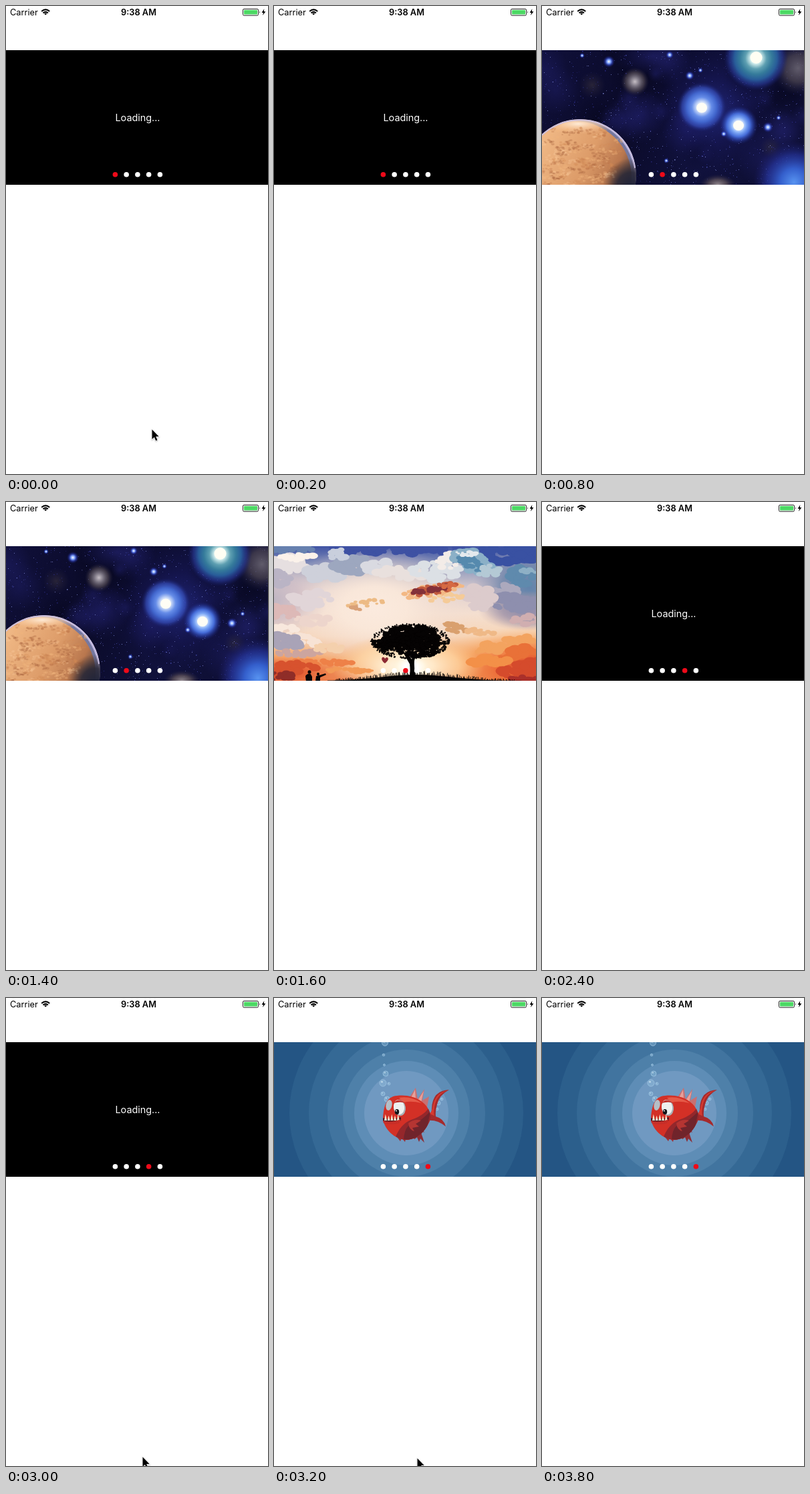
These frames come from a looping animation (392 px wide and 699 px high, 4000 ms). An HTML page with a canvas:

```html
<!DOCTYPE html>
<html lang="en">
<head>
<meta charset="utf-8">
<title>Image carousel</title>
<style>
  html, body { margin: 0; width: 100%; height: 100%; overflow: hidden; background: #fff; }
  canvas, svg { position: absolute; left: 0; top: 0; width: 392px; height: 699px; }
  text { font-family: Inter, Roboto, sans-serif; }
</style>
</head>
<body>
<canvas id="stage" width="392" height="699"></canvas>
<svg viewBox="0 0 392 699">
  <text x="6" y="14" font-size="12.8">Carrier</text>
  <text x="198.5" y="14" font-size="12.8" font-weight="600" text-anchor="middle">9:38 AM</text>
  <g fill="none" stroke="#000" stroke-width="2">
    <path d="M53.2 8.1Q59.2 2.6 65.2 8.1M55.5 10.5Q59.2 7.2 62.9 10.5"/>
    <path d="M57.2 11.4Q59.2 9.7 61.2 11.4L59.2 13.6Z" fill="#000" stroke="none"/>
  </g>
  <rect x="354.5" y="4.5" width="23" height="9.6" rx="1.6" fill="#fff" stroke="#222"/>
  <rect x="356" y="6" width="20" height="6.6" rx=".6" fill="#4cd964"/>
  <path d="M379 7.5Q380.6 9.3 379 11.1Z"/>
  <path d="M386.3 4.3L382.6 9.9H385L384 14L388.4 8.3H385.8Z"/>
  <text id="loading" x="197" y="172" font-size="14.4" text-anchor="middle" fill="#fff">Loading...</text>
</svg>
<script>
const LOOP = 4000, TOP = 66, W = 392, H = 201;
const ctx = document.getElementById('stage').getContext('2d');
const loading = document.getElementById('loading');

function seeded(seed) {
  return () => {
    seed = (seed * 1664525 + 1013904223) % 4294967296;
    return seed / 4294967296;
  };
}

function makePage(paint) {
  const page = document.createElement('canvas');
  page.width = W;
  page.height = H;
  const c = page.getContext('2d');
  c.translate(0, -TOP);
  paint(c);
  return page;
}

function oval(c, x, y, rx, ry, color, turn = 0) {
  c.fillStyle = color;
  c.beginPath();
  c.ellipse(x, y, rx, ry, turn, 0, 7);
  c.fill();
}

function shape(c, d, color) {
  c.fillStyle = color;
  c.fill(new Path2D(d));
}

// Radial glow with evenly spaced colours, optionally squashed
function glow(c, x, y, r, colors, squash = 1) {
  c.save();
  c.translate(x, y);
  c.scale(1, squash);
  const g = c.createRadialGradient(0, 0, 0, 0, 0, r);
  colors.forEach((col, i) => g.addColorStop(i / (colors.length - 1), col));
  c.fillStyle = g;
  c.fillRect(-r, -r, 2 * r, 2 * r);
  c.restore();
}

// Lumpy patch made of small discs spread over an ellipse
function patch(c, rnd, x, y, w, h, color, n, size, tilt = 0) {
  for (let i = 0; i < n; i++) {
    const a = rnd() * 6.283, d = Math.sqrt(rnd());
    const dx = Math.cos(a) * d * w;
    const r = size * (.5 + rnd() * .7);
    oval(c, x + dx, y + Math.sin(a) * d * h + dx * tilt, r * 1.2, r * .8, color);
  }
}

function paintSpace(c) {
  const rnd = seeded(7);
  const bg = c.createLinearGradient(0, 66, 392, 267);
  bg.addColorStop(0, '#10103a');
  bg.addColorStop(.35, '#0a0a28');
  bg.addColorStop(.65, '#10113b');
  bg.addColorStop(1, '#0c0d30');
  c.fillStyle = bg;
  c.fillRect(0, TOP, W, H);

  for (let i = 0; i < 45; i++) {
    const tone = rnd() < .5 ? '35,35,115' : '4,4,22';
    glow(c, rnd() * W, TOP + rnd() * H, 12 + rnd() * 30, [`rgba(${tone},.4)`, `rgba(${tone},0)`]);
  }
  glow(c, 255, 155, 105, ['rgba(45,55,165,.6)', 'rgba(30,30,115,.3)', 'rgba(20,20,80,0)']);
  glow(c, 165, 75, 60, ['rgba(45,45,140,.45)', 'rgba(35,35,120,0)'], .5);
  glow(c, 75, 118, 20, ['rgba(55,48,60,.65)', 'rgba(40,35,60,0)']);
  glow(c, 342, 211, 16, ['rgba(45,42,60,.7)', 'rgba(40,35,60,0)']);

  const tints = ['#3434a0', '#5058c4', '#8892e0', '#292978'];
  for (let i = 0; i < 1100; i++) {
    c.globalAlpha = .25 + rnd() * .65;
    c.fillStyle = tints[Math.floor(rnd() * 4)];
    const s = rnd() < .94 ? 1 : 1.5;
    c.fillRect(Math.floor(rnd() * W), TOP + Math.floor(rnd() * H), s, s);
  }
  c.globalAlpha = 1;

  glow(c, 139, 113, 21, ['#c5bec5', '#77717f', 'rgba(74,66,78,.75)', 'rgba(40,36,60,0)']);
  glow(c, 383, 93, 39, ['rgba(105,100,113,.9)', 'rgba(74,67,80,.75)', 'rgba(30,30,65,0)'], 1.05);
  glow(c, 263, 267, 27, ['#948b91', 'rgba(92,80,88,.8)', 'rgba(40,35,60,0)'], .58);
  glow(c, 377, 263, 61, ['#5792f0', '#345fcc', 'rgba(39,54,160,.7)', 'rgba(30,30,110,0)']);

  const clear = 'rgba(25,32,110,0)';
  glow(c, 320, 78, 48, ['#fff', '#d7f1f0', '#5d9fb1', '#357b9b', '#285c99', 'rgba(39,55,147,.65)', clear]);
  oval(c, 320.5, 77, 9, 9, '#fffef3');
  glow(c, 239, 151, 37, ['#fff', '#d5e2fa', '#658ce8', '#4267ce', 'rgba(55,80,190,.65)', clear]);
  oval(c, 239, 152, 8, 7.5, '#fffdf5');
  glow(c, 294, 178, 29, ['#fff', '#e4f0ff', '#7ca6f5', '#456cd8', 'rgba(45,70,180,.5)', clear]);
  oval(c, 294, 178.5, 8, 7.5, '#fffdf5');

  const small = [[221, 104, 7], [338, 181, 8], [100, 83, 9], [272, 191, 5], [237, 96, 4],
    [186, 231, 4], [191, 73, 6], [60, 74, 4], [354, 167, 4]];
  for (const [x, y, r] of small) {
    glow(c, x, y, r, ['#fff', '#789cf8', 'rgba(50,70,210,.45)', clear]);
  }

  c.save();
  c.beginPath();
  c.arc(57, 253, 84, 0, 7);
  c.clip();
  oval(c, 57, 253, 84, 84, '#b4aedb');
  oval(c, 55, 254, 83, 83, '#75789f');
  const skin = c.createLinearGradient(5, 195, 132, 263);
  skin.addColorStop(0, '#efb784');
  skin.addColorStop(.5, '#dd9c69');
  skin.addColorStop(.8, '#b9774e');
  skin.addColorStop(1, '#4b3f46');
  oval(c, 49, 256, 85, 84, skin);
  glow(c, 54, 176, 63, ['rgba(255,238,219,.95)', 'rgba(250,204,161,.6)', 'rgba(240,180,130,0)'], .25);
  const lands = ['#f5c496', '#cf8955', '#bd774b', '#eeb37e', '#a7643e'];
  for (let i = 0; i < 85; i++) {
    c.globalAlpha = .32;
    patch(c, rnd, rnd() * 116, 182 + rnd() * 88, 9, 4, lands[Math.floor(rnd() * 5)], 9, 2);
  }
  c.globalAlpha = 1;
  glow(c, 134, 270, 43, ['#20243a', 'rgba(42,40,54,.9)', 'rgba(60,45,45,0)']);
  c.strokeStyle = '#c9bfdf';
  c.lineWidth = 2;
  c.beginPath();
  c.arc(57, 253, 83, 3.9, 6.15);
  c.stroke();
  c.restore();
}

function paintSunset(c) {
  const rnd = seeded(21);
  const bg = c.createLinearGradient(0, TOP, 0, TOP + H);
  ['#4054a4', '#929bbd', '#dfd0d0', '#f4dfd0', '#f7d5b7', '#f2a56b', '#dd5836']
    .forEach((col, i) => bg.addColorStop(i / 6, col));
  c.fillStyle = bg;
  c.fillRect(0, TOP, W, H);

  glow(c, 150, 158, 145, ['#fbeade', 'rgba(250,232,218,.95)', 'rgba(245,225,212,.55)', 'rgba(240,220,210,0)'], .65);
  glow(c, 382, 128, 85, ['#6183ab', 'rgba(112,134,170,.85)', 'rgba(150,150,180,0)'], .75);
  glow(c, 380, 163, 75, ['#918eac', 'rgba(160,144,165,.7)', 'rgba(190,160,165,0)'], .4);
  glow(c, 0, 145, 80, ['#c0b6c3', 'rgba(208,190,198,.8)', 'rgba(225,205,205,0)'], .8);
  glow(c, 0, 255, 150, ['#cb4027', 'rgba(231,100,55,.95)', 'rgba(245,156,95,.6)', 'rgba(250,190,140,0)'], .24);
  glow(c, 392, 248, 165, ['#d04429', 'rgba(236,105,53,.95)', 'rgba(246,158,88,.75)', 'rgba(250,195,140,0)'], .38);
  glow(c, 200, 245, 115, ['#fffdf5', '#ffe9c9', 'rgba(255,215,165,.75)', 'rgba(250,190,130,0)'], .42);

  c.filter = 'blur(.7px)';
  const puff = (...a) => patch(c, rnd, ...a);
  // upper sky and cumulus
  puff(185, 70, 105, 7, '#3e51a3', 75, 7);
  puff(350, 78, 48, 12, '#3951a2', 55, 8);
  puff(25, 70, 34, 5, '#6781af', 25, 6);
  puff(22, 93, 34, 13, '#e6dfe0', 40, 8);
  puff(35, 82, 27, 5, '#fbf2ea', 24, 5);
  puff(6, 115, 18, 10, '#bab4c5', 18, 7);
  puff(74, 107, 32, 12, '#ced0da', 35, 8);
  puff(119, 93, 29, 14, '#9da7bf', 42, 7);
  puff(97, 78, 17, 7, '#c9cfdd', 18, 5);
  puff(160, 98, 24, 10, '#d9dae1', 28, 7);
  puff(187, 107, 38, 9, '#e9e0dd', 36, 7);
  puff(244, 103, 37, 14, '#dce0e5', 48, 7);
  puff(263, 88, 19, 12, '#f3ece8', 28, 5);
  puff(298, 89, 31, 15, '#8bb0c7', 50, 7, .32);
  puff(295, 91, 21, 9, '#568aae', 26, 5, .35);
  puff(287, 77, 17, 4, '#e4e9ed', 18, 3);
  puff(320, 102, 17, 9, '#b4c9d5', 18, 5);
  puff(369, 111, 22, 13, '#5f8aad', 30, 7);
  puff(382, 103, 13, 4, '#8eb0c5', 13, 4);
  puff(340, 133, 28, 10, '#aca9bd', 24, 7);
  puff(361, 151, 31, 12, '#8e8fae', 32, 8);
  puff(376, 176, 22, 7, '#d0aeb0', 20, 6);
  puff(307, 143, 23, 17, '#dccbcc', 26, 8);
  // left bank
  puff(51, 145, 34, 12, '#e1d5d8', 26, 8);
  puff(12, 164, 25, 9, '#ddb9b7', 23, 7);
  puff(58, 176, 28, 7, '#edd5cc', 20, 6);
  puff(14, 190, 20, 6, '#f8e8dd', 24, 5);
  puff(45, 205, 27, 6, '#f7e3d5', 25, 5, .25);
  puff(17, 208, 28, 9, '#a9a3b7', 34, 7, .15);
  puff(37, 225, 34, 5, '#cca59f', 25, 5);
  puff(81, 218, 26, 5, '#f4d0ad', 20, 5);
  // warm streaks
  puff(137, 151, 29, 5, '#edbb85', 26, 3, -.13);
  puff(127, 157, 14, 4, '#d9a178', 14, 3);
  puff(238, 132, 44, 9, '#f3b884', 45, 4, -.16);
  puff(241, 130, 35, 7, '#c35b3e', 44, 4, -.18);
  puff(236, 130, 29, 4, '#84313a', 32, 4, -.18);
  puff(262, 127, 11, 5, '#d66a43', 14, 3);
  puff(259, 143, 25, 5, '#f5cb98', 20, 4, -.12);
  puff(270, 188, 17, 6, '#d9a06e', 24, 4, .25);
  puff(308, 194, 26, 4, '#efb987', 22, 4, .1);
  puff(344, 213, 45, 8, '#f3a35f', 36, 7, -.2);
  puff(366, 225, 32, 8, '#e97138', 32, 7, -.25);
  puff(316, 238, 34, 7, '#f39048', 27, 7);
  puff(371, 250, 38, 11, '#d54b2c', 40, 8, -.12);
  puff(70, 240, 55, 4, '#ee8148', 40, 4);
  puff(27, 247, 39, 7, '#d7522e', 38, 6);
  puff(111, 252, 37, 4, '#f29a57', 26, 4);
  puff(8, 261, 22, 7, '#8f2d28', 26, 5);
  puff(379, 265, 26, 4, '#aa302a', 24, 5);
  c.filter = 'none';

  glow(c, 205, 247, 29, ['#fff', '#fff', 'rgba(255,248,230,.8)', 'rgba(255,235,200,0)'], .72);

  // hill and grass
  const hill = x => 267 - 9 * Math.exp(-(((x - 213) / 75) ** 2));
  c.fillStyle = c.strokeStyle = '#050303';
  c.beginPath();
  c.moveTo(80, 268);
  for (let x = 80; x <= W; x += 4) c.lineTo(x, hill(x));
  c.lineTo(W, 268);
  c.fill();
  c.lineWidth = .8;
  for (let x = 92; x < 358; x += 1.6) {
    const y = hill(x), tall = (2 + rnd() * 6) * (1 - Math.abs(x - 220) / 190);
    c.beginPath();
    c.moveTo(x, y + 2);
    c.lineTo(x + (rnd() - .5) * 5, y - tall);
    c.stroke();
  }

  // tree
  shape(c, 'M200 268Q205 259 203 242L194 226L199 225L206 235L209 225L213 226L210 237Q209 258 216 268Z', '#030202');
  const leaf = '#050303';
  patch(c, rnd, 204, 200, 42, 15, leaf, 240, 4);
  patch(c, rnd, 202, 211, 55, 10, leaf, 240, 3);
  patch(c, rnd, 216, 220, 33, 11, leaf, 130, 3);
  patch(c, rnd, 177, 219, 23, 8, leaf, 85, 2.5);
  for (let i = 0; i < 240; i++) {
    const a = rnd() * 6.283, d = .9 + rnd() * .14;
    oval(c, 204 + Math.cos(a) * 57 * d, 208 + Math.sin(a) * 25 * d, 1.5, 1, leaf, a);
  }
  patch(c, rnd, 204, 222, 40, 6, '#f6dcb9', 16, .7);

  // two figures and the heart
  oval(c, 53, 254, 2.5, 2.7, '#080405');
  shape(c, 'M48 268L47 260Q50 255 55 257L57 261V268Z', '#080405');
  oval(c, 66, 257, 2, 2.2, '#080405');
  shape(c, 'M62 268L63 260L67 259L77 256L78 258L69 262V268Z', '#080405');
  shape(c, 'M166 241Q159 236 162 232Q165 231 166 234Q169 230 171 234Q171 237 166 241Z', '#8c2933');
}

function paintFish(c) {
  c.fillStyle = '#245584';
  c.fillRect(0, TOP, W, H);
  const rings = [[175, '#2c5f8c'], [146, '#356995'], [118, '#41749f'], [95, '#4e80a9'],
    [78, '#5e8db6'], [63, '#7099c1']];
  for (const [r, col] of rings) oval(c, 198, 172, r, r, col);

  c.lineWidth = 1;
  const bubbles = [[163, 127, 5], [167, 113, 4], [166, 67, 4.5], [172, 128, 2], [164, 85, 1.8],
    [163, 143, 3], [169, 151, 4], [165, 100, 1.5], [246, 157, 3], [251, 151, 2], [244, 166, 2]];
  for (const [x, y, r] of bubbles) {
    oval(c, x, y, r, r, 'rgba(150,192,224,.42)');
    c.strokeStyle = 'rgba(167,205,232,.65)';
    c.stroke();
    oval(c, x - r * .3, y - r * .35, r * .25, r * .25, '#c4deed');
  }

  // fins and tail
  shape(c, 'M202 149L212 134L215 151L225 136L222 153L232 147L229 163Z', '#c87072');
  shape(c, 'M205 149L211 137L212 152ZM215 153L224 139L220 156Z', '#e8a09a');
  shape(c, 'M227 173Q236 178 236 165Q237 138 262 137Q247 145 244 159Q241 170 242 177Q254 180 257 192Q244 181 229 183Z', '#a52a2c');
  shape(c, 'M233 173Q237 168 238 160Q242 141 260 138Q245 143 241 158Q238 171 240 176Z', '#d63a30');
  shape(c, 'M181 204L189 214L191 209L196 215L198 207Z', '#9c3037');
  shape(c, 'M202 190L210 211L214 208L217 215L219 210L225 216L219 198L225 201L217 188Z', '#8d2b33');

  // body
  const body = 'M163 180C164 164 167 147 184 146C208 143 232 155 235 178C228 199 215 211 198 212C181 211 165 197 163 180Z';
  shape(c, body, '#d33026');
  c.save();
  c.clip(new Path2D(body));
  shape(c, 'M237 154Q230 174 205 182Q190 188 182 207L205 220L245 194Z', '#94272b');
  shape(c, 'M234 169Q216 188 201 191Q195 197 194 211L225 213Z', '#70242b');
  shape(c, 'M187 149Q205 146 221 157Q205 153 194 156Z', '#e65a48');
  c.restore();

  // mouth and teeth
  shape(c, 'M163 179Q174 183 190 178L190 183Q178 188 163 184Z', '#4d1620');
  for (let i = 0; i < 5; i++) {
    const x = 165 + i * 4.7, tip = 173.5 + (i % 2) * 2;
    shape(c, `M${x} 183L${x + 1.8} ${tip}L${x + 4} 183Z`, '#f8eed3');
  }
  shape(c, 'M163 183Q175 187 190 181L187 187Q174 190 164 187Z', '#c52e28');

  // eyes
  oval(c, 172, 160, 4.5, 8, '#b5bfc7', .2);
  oval(c, 188, 164, 9, 12, '#a9b0b5', -.15);
  oval(c, 187, 163, 8, 11, '#edf0ef', -.15);
  oval(c, 184, 170, 3.2, 4, '#131619');
  oval(c, 183, 168.5, 1, 1, '#fff');
  shape(c, 'M179 157Q186 148 196 157Q190 154 179 157Z', '#bd2d28');

  // side fin
  shape(c, 'M201 187Q210 180 220 183L212 188L217 192L207 194L210 199Q202 197 201 187Z', '#b53532');
}

const pages = {
  space: makePage(paintSpace),
  sunset: makePage(paintSunset),
  fish: makePage(paintFish)
};
const slides = [
  { until: 800, dot: 0 },
  { until: 1600, dot: 1, page: pages.space },
  { until: 2400, dot: 2, page: pages.sunset },
  { until: 3200, dot: 3 },
  { until: LOOP, dot: 4, page: pages.fish }
];
const pointer = [
  { from: 0, until: 200, x: 218.5, y: 632.5 },
  { from: 3000, until: 3200, x: 204.5, y: 685.5 },
  { from: 3200, until: 3800, x: 214.5, y: 687.5 }
];

function drawPointer({ x, y }) {
  ctx.save();
  ctx.translate(x, y);
  const arrow = new Path2D('M0 0V14.5L3.4 11.4L5.7 16.7L8 15.7L5.7 10.6H10.2Z');
  ctx.shadowColor = 'rgba(0,0,0,.3)';
  ctx.shadowBlur = 2;
  ctx.shadowOffsetY = 1;
  ctx.strokeStyle = '#fff';
  ctx.lineWidth = 1.4;
  ctx.stroke(arrow);
  ctx.shadowColor = 'transparent';
  ctx.fillStyle = '#000';
  ctx.fill(arrow);
  ctx.restore();
}

function draw(now) {
  const t = now % LOOP;
  const slide = slides.find(s => t < s.until);
  ctx.fillStyle = '#fff';
  ctx.fillRect(0, 0, W, 699);
  if (slide.page) {
    ctx.drawImage(slide.page, 0, TOP);
  } else {
    ctx.fillStyle = '#000';
    ctx.fillRect(0, TOP, W, H);
  }
  loading.style.display = slide.page ? 'none' : '';
  for (let i = 0; i < 5; i++) {
    oval(ctx, 163.4 + i * 16.75, 251.8, 3.8, 3.8, i === slide.dot ? '#ee0a19' : '#fff');
  }
  const spot = pointer.find(p => t >= p.from && t < p.until);
  if (spot) drawPointer(spot);
}

const start = performance.now();
function tick() {
  draw(performance.now() - start);
  requestAnimationFrame(tick);
}
tick();
</script>
</body>
</html>
```
